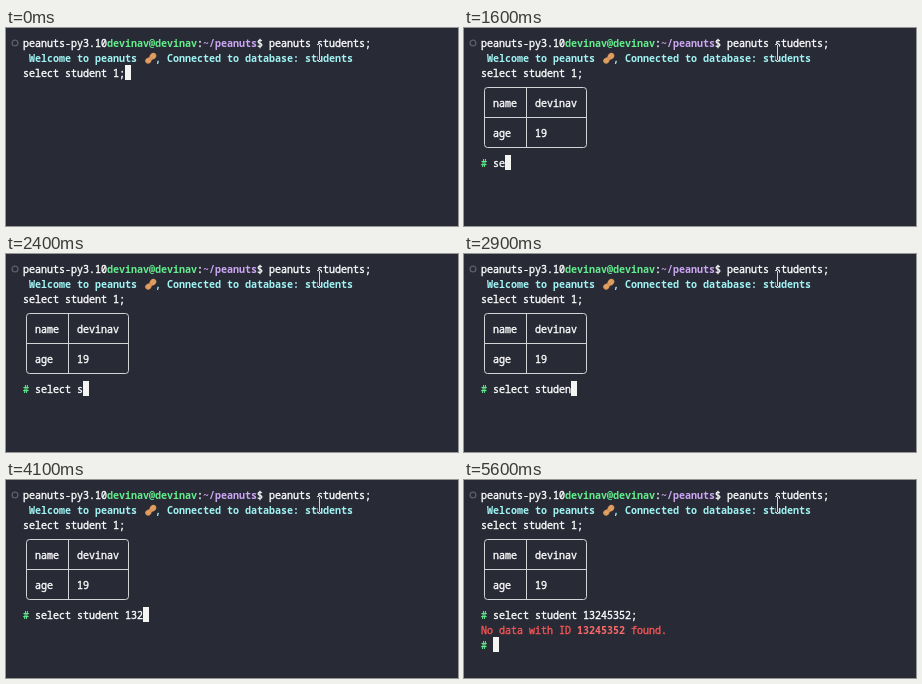
Write an HTML page that moves like this. It is 452 px wide and 198 px high and loops after 5.7 s.

```html
<!DOCTYPE html>
<html lang="en">
<head>
<meta charset="utf-8">
<title>Terminal session</title>
<style>
  html, body { margin: 0; width: 100%; height: 100%; overflow: hidden; background: #282a36; }
  svg { display: block; width: 452px; height: 198px; }
  text {
    font: 10px "Noto Sans Mono", "DejaVu Sans Mono", monospace;
    font-variant-ligatures: none;
    white-space: pre;
    color: #fff;
    fill: currentColor;
    stroke: currentColor;
    stroke-width: .35px;
  }
  tspan { fill: currentColor; stroke: currentColor; }
  .b { font-weight: 700; stroke-width: 0; }
  .green { color: #62ee8c; }
  .purple { color: #cda6f4; }
  .cyan { color: #a0f4f4; }
  .red { color: #f55555; }
  .red .b { color: #fa6a68; }
  .line { fill: none; stroke: #d2d3d6; }
</style>
</head>
<body>
<svg viewBox="0 0 452 198">
  <circle cx="9" cy="15" r="2.9" fill="none" stroke="#5c5e69" stroke-width="1.3"/>

  <text x="17" y="19">peanuts-py3.10<tspan class="b green">devinav@devinav</tspan>:<tspan class="b purple">~/peanuts</tspan>$ peanuts students;</text>
  <text class="b cyan" x="23" y="34">Welcome to peanuts</text>
  <text class="b cyan" x="149" y="34">, Connected to database: students</text>

  <g transform="translate(144.8 30.3) rotate(-43)">
    <path d="M-6.6 0C-6.6-3.4-2.6-3.4-.4-1.8C2-3.7 6.6-3.4 6.6 0S2 3.7-.4 1.8C-2.6 3.4-6.6 3.4-6.6 0Z" fill="#d99658"/>
    <path d="M-5-.7H-2M1-1.2H5M-4.4 1H-2M1.5 1H4.6" stroke="#efb981" stroke-width=".7" fill="none"/>
  </g>

  <text x="17" y="49">select student 1;</text>

  <g id="table">
    <rect class="line" x="20.5" y="59.5" width="102" height="60" rx="3"/>
    <path class="line" d="M62.5 59.5V119.5M20.5 89.5H122.5"/>
    <text x="29" y="79">name</text>
    <text x="71" y="79">devinav</text>
    <text x="29" y="109">age</text>
    <text x="71" y="109">19</text>
    <text class="b green" x="17" y="139">#</text>
    <text id="typed" x="29" y="139"></text>
  </g>

  <g id="error">
    <text class="red" x="17" y="154">No data with ID <tspan class="b">13245352</tspan> found.</text>
    <text class="b green" x="17" y="169">#</text>
  </g>

  <rect id="cursor" width="6" height="15" fill="#f4f4f2"/>

  <g fill="none">
    <path d="M313.5 16V33" stroke="#282a36" stroke-width="3"/>
    <path d="M313.5 17V32M311 16.5H313M314 16.5H316M311 32.5H313M314 32.5H316" stroke="#d4d5da"/>
  </g>
</svg>
<script>
  const LOOP = 5700, TABLE_AT = 200, ERROR_AT = 5200;
  const command = "select student 13245352;";
  const keyTimes = [
    1200, 1400, 1700, 1800, 1900, 2000, 2200,
    2300, 2500, 2600, 2700, 2800, 2900, 3000, 3200,
    3500, 3700, 3900, 4200, 4400, 4500, 4600, 4700, 5000
  ];
  const $ = id => document.getElementById(id);
  const table = $("table"), typed = $("typed"), error = $("error"), cursor = $("cursor");
  const show = (el, on) => el.setAttribute("visibility", on ? "visible" : "hidden");

  function placeCursor(col, row) {
    cursor.setAttribute("x", 17 + col * 6);
    cursor.setAttribute("y", 7 + row * 15);
  }

  function draw(t) {
    const count = keyTimes.filter(k => k <= t).length;
    show(table, t >= TABLE_AT);
    show(error, t >= ERROR_AT);
    typed.textContent = command.slice(0, count);
    if (t < TABLE_AT) placeCursor(17, 2);
    else if (t < ERROR_AT) placeCursor(2 + count, 8);
    else placeCursor(2, 10);
  }

  const start = performance.now();
  function tick() {
    draw((performance.now() - start) % LOOP);
    requestAnimationFrame(tick);
  }
  tick();
</script>
</body>
</html>
```
